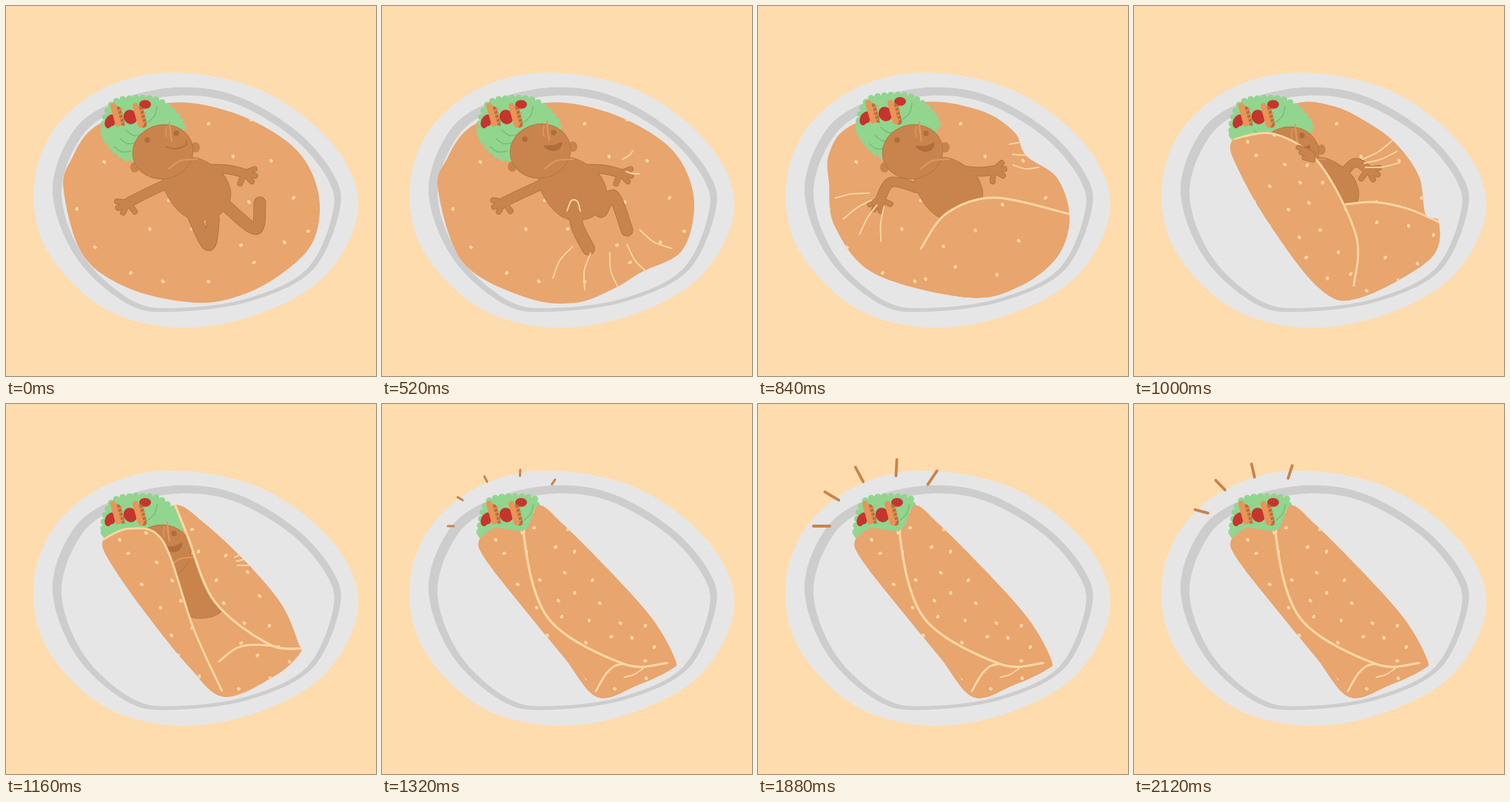
An HTML page with a canvas that plays this animation: 500x500 px, repeating every 2200 ms.

```html
<!DOCTYPE html>
<html>
<head>
<meta charset="utf-8">
<style>
html, body { margin: 0; width: 100%; height: 100%; overflow: hidden; background: #ffdcae }
canvas { display: block; width: 500px; height: 500px }
</style>
</head>
<body>
<canvas id="c" width="500" height="500"></canvas>
<script>
const ctx = document.getElementById('c').getContext('2d');
ctx.lineCap = ctx.lineJoin = 'round';
const DOUGH = '#e8a56e', CREAM = '#ffd7a4', SKIN = '#c8844c', EDGE = '#b67440', FACE = '#b06d3b',
  STRAND = '#e0985f', GREEN = '#91d58f', VEIN = '#75bd75', RED = '#c5352d', CARROT = '#e79558';
const RAD = Math.PI / 180;

const nums = s => s.split(/[ ,]+/).map(Number);
const poses = (...list) => list.map(nums);
const pairs = p => p.flatMap((x, i) => i % 2 ? [] : [[x, p[i + 1]]]);
const polar = (x, y, deg, r, ry = r) => [x + r * Math.cos(deg * RAD), y + ry * Math.sin(deg * RAD)];

const rim = nums('37,250 62,171 130,112 225,90 345,114 440,185 476,272 430,366 330,420 225,434 130,407 57,333');
const ring = nums('63,250 92,168 150,128 230,110 310,121 390,167 441,225 451,275 414,357 330,399 230,413 165,403 95,340');

// Key poses: lying, kicking, legs tucked, left side folded, wrapped
const KEYS = [0, 1, 5, 7, 10];
const tortilla = poses(
  '78,250 88,208 125,160 220,131 300,142 370,176 408,215 424,268 413,322 372,362 320,390 258,401 170,383 105,338',
  '76,250 87,208 125,160 220,131 300,142 370,176 407,215 422,270 405,331 350,360 315,381 262,401 195,394 110,347',
  '96,240 96,200 125,162 220,130 300,141 346,170 362,202 404,232 421,285 405,338 355,378 285,394 158,362 104,298',
  '136,210 132,183 152,172 218,132 268,135 310,154 353,185 385,230 394,281 412,292 400,342 303,395 250,381 180,290',
  '140,210 131,185 152,168 193,170 212,137 245,163 305,223 365,290 396,345 390,359 345,380 291,396 245,341 185,268');
const lettuce = poses(
  '132,168 140,137 160,126 206,128 238,160 222,182 172,206 145,193',
  '132,173 140,137 160,126 206,128 204,150 195,170 170,180 140,178');
const torso = nums('212,236 228,213 258,206 293,228 303,258 285,284 252,288 226,268');

// Only the moving edge of each flap; the rest is bounded by the tortilla
const low0 = '205,405 263,402 330,378 405,333';
const lowFlap = poses(low0, low0, '220,328 255,280 320,259 420,281', '286,268 325,265 370,274 412,292', '289,388 305,362 326,351 385,350');
const left0 = '85,180 80,230 80,280 105,340 150,380';
const leftFlap = poses(left0, left0, left0, '133,180 190,173 250,212 300,310 297,378', '128,186 155,166 193,172 230,300 289,392');
const right0 = '270,130 352,175 395,220 410,270 425,292';
const rightFlap = poses(right0, right0, right0, right0, '207,138 192,180 225,290 326,351 385,350');

// Limbs: three joints each
const leftArm = poses('218,240 190,253 165,266', '218,240 190,253 165,265', '215,246 180,238 165,262', '205,225 215,215 226,206');
const rightArm = poses('275,220 300,221 322,226', '275,220 300,221 322,226', '275,222 300,224 318,222', '278,232 298,212 316,221');
const leftLeg = poses('248,270 273,322 280,288', '260,270 264,298 279,328', '262,272 270,285 275,295');
const rightLeg = poses('295,268 337,301 343,266', '296,278 313,257 331,303', '290,268 300,285 305,295');
const headShift = poses('0,0', '2,-1', '-3,0', '-3,3');
const saladShift = poses('0,0', '0,0', '4,-4', '0,0');

// Creases spread from a point: x, y, first and last angle, count, inner and outer radius
const creases = [
  [],
  poses('292,270 122 30 5 65 115', '310,220 -40 10 2 20 38'),
  poses('172,250 95 172 4 22 68', '290,210 -25 5 3 55 90'),
  poses('285,222 -32 -8 3 28 75'),
  poses('300,382 -25 -25 1 30 58')];

function curve(flat, closed) {
  const p = pairs(flat), n = p.length, path = new Path2D();
  const get = i => closed ? p[(i + n) % n] : p[Math.max(0, Math.min(n - 1, i))];
  path.moveTo(...p[0]);
  for (let i = 0; i < (closed ? n : n - 1); i++) {
    const [a, b, c, d] = [get(i - 1), get(i), get(i + 1), get(i + 2)];
    path.bezierCurveTo(b[0] + (c[0] - a[0]) / 6, b[1] + (c[1] - a[1]) / 6,
      c[0] - (d[0] - b[0]) / 6, c[1] - (d[1] - b[1]) / 6, ...c);
  }
  return path;
}

function fill(flat, color) {
  ctx.fillStyle = color;
  ctx.fill(curve(flat, true));
}

function line(flat, color, width, closed) {
  ctx.strokeStyle = color;
  ctx.lineWidth = width;
  ctx.stroke(curve(flat, closed));
}

function oval(x, y, rx, ry, color, turn = 0) {
  ctx.fillStyle = color;
  ctx.beginPath();
  ctx.ellipse(x, y, rx, ry, turn, 0, 7);
  ctx.fill();
}

function pose(keys, k) {
  let i = 0;
  while (i < 3 && k >= KEYS[i + 1]) i++;
  const f = Math.min(1, (k - KEYS[i]) / (KEYS[i + 1] - KEYS[i]));
  const last = keys[keys.length - 1], a = keys[i] || last, b = keys[i + 1] || last;
  return a.map((v, j) => v + (b[j] - v) * f);
}

// A sheet of dough with sesame scattered on a jittered grid
function dough(path, seed, gap) {
  const rand = () => (seed = seed * 16807 % 2147483647) / 2147483647;
  ctx.save();
  ctx.clip(path);
  ctx.fillStyle = DOUGH;
  ctx.fillRect(0, 0, 500, 500);
  for (let y = 100, row = 0; y < 410; y += gap * .85, row++)
    for (let x = 60 + row % 2 * gap / 2; x < 440; x += gap)
      oval(x + gap * .5 * rand(), y + gap * .5 * rand(), 2.7, 2.1, CREAM, rand() * 3);
  ctx.restore();
}

function flap(edge, corners, seed, gap, width) {
  const path = curve(edge);
  for (const c of corners) path.lineTo(...c);
  dough(path, seed, gap);
  line(edge, CREAM, width);
}

function drawPlate() {
  ctx.fillStyle = '#ffdcae';
  ctx.fillRect(0, 0, 500, 500);
  fill(rim, '#e6e6e6');
  fill(ring, '#cdcdcd');
  ctx.save();
  ctx.translate(15.4, 16.9);
  ctx.scale(.946, .947);
  fill(ring, '#e6e6e6');
  ctx.restore();
}

function drawSalad(k) {
  ctx.save();
  ctx.translate(...pose(saladShift, k));
  const leaf = pose(k < 10 ? lettuce.slice(0, 1) : lettuce.slice(1), k);
  fill(leaf, GREEN);
  ctx.setLineDash([0, 9]);
  line(leaf, GREEN, 9, true);
  ctx.setLineDash([]);
  oval(141, 156, 7, 10, RED, .5);
  oval(168, 150, 9, 10, RED, -.6);
  oval(188, 133, 8, 6, RED);
  for (const x of [148, 178]) {
    line([x + 3, 140, x + 8, 160], '#b9703f', 9);
    line([x - 3, 135, x + 4, 160], CARROT, 8);
    for (let y = 139; y < 160; y += 6) line([x + 3, y + 3, x + 10, y], CARROT, 1.5);
  }
  for (let i = 0; i < 6; i++) oval(136 + i * 10, 173 - 4 * Math.sin(i), 8, 8, GREEN);
  if (k < 10)
    for (let i = 0; i < 3; i++) line([146 + i * 8, 190 - i * 11, 156 + i * 8, 197 - i * 11, 169 + i * 6, 196 - i * 11], VEIN, 1.5);
  line([204, 136, 201, 148, 192, 157], VEIN, 1.5);
  ctx.restore();
}

function drawHead(k) {
  ctx.save();
  ctx.translate(...pose(headShift, k));
  for (const [x, y] of [[174, 218], [256, 191]]) oval(x, y, 6, 7, SKIN);
  oval(212, 197, 41.5, 37, EDGE, -.2);
  oval(212, 197, 40.5, 36, SKIN, -.2);
  oval(191, 181, 3.8, 3.8, FACE);
  oval(230, 172, 3.8, 3.8, FACE);
  if (k) fill([216, 190, 229, 189, 241, 185, 238, 194, 227, 197], FACE);
  else line([216, 190, 230, 193, 243, 188, 244, 182], FACE, 1.7);
  line([221, 157, 222, 170, 224, 182], STRAND, 2.2);
  line([217, 163, 216, 171, 217, 177], STRAND, 1.5);
  ctx.restore();
}

// Three fingers and a thumb, turned along the forearm
function fingers(arm, side) {
  const [, , ex, ey, x, y] = arm;
  const aim = Math.atan2(y - ey, x - ex) / RAD;
  return [-35, 0, 35, 100].map(a => [x, y, ...polar(x, y, aim + side * a, 15)]);
}

function drawBody(k) {
  const la = pose(leftArm, k), ra = pose(rightArm, k);
  const parts = [[la, 12], [ra, 11], ...[...fingers(la, -1), ...fingers(ra, 1)].map(f => [f, 6])];
  if (k < 7) parts.push([pose(leftLeg, k), 16], [pose(rightLeg, k), 15]);
  for (const [color, extra] of [[EDGE, 2], [SKIN, 0]]) {
    for (const [p, w] of parts) line(p, color, w + extra);
    fill(torso, color);
    line(torso, color, extra || .5, true);
  }
  drawHead(k);
  line([220, 220, 236, 209, 258, 207], STRAND, 2);
  if (k && k < 4) line([250, 277, 256, 263, 264, 264, 268, 277], CREAM, 1.8);
}

function drawFlaps(k) {
  if (k > 1) {
    const e = pose(lowFlap, k);
    flap(e, [[450, 420], [e[0], 420]], 5, k < 7 ? 58 : 45, 2.8);
  }
  if (k > 5) flap(pose(leftFlap, k), [[280, 440], [0, 440], [0, 180]], 11, 38, k < 10 ? 2.8 : 0.1);
  if (k > 6 && k < 9)
    for (const [color, w] of [[EDGE, 7], [SKIN, 5]])
      for (let i = 0; i < 3; i++) line([222 + i * 4, 191 + i * 7, 232 + i * 3, 195 + i * 6, 242, 200 + i * 4], color, w);
  if (k > 7) flap(pose(rightFlap, k), [[500, 350], [500, 100], [207, 100]], 29, 36, 3.2);
}

function drawCreases(list) {
  for (const [x, y, from, to, count, r0, r1] of list)
    for (let i = 0; i < count; i++) {
      const a = from + (to - from) * i / Math.max(1, count - 1);
      line([r0, (r0 + r1) / 2, r1].flatMap((r, j) => polar(x, y, a + j % 2 * 3, r)), CREAM, 1.8);
    }
}

function drawRays(k) {
  const odd = k % 2 && k > 11, length = k === 11 ? 8 : odd ? 18 : 22;
  for (let a = odd ? 195 : 180; a < 305; a += 31) {
    const [x, y] = polar(182, 165, a, 85, 68);
    line([x, y, ...polar(x, y, a, length)], SKIN, k === 11 ? 3 : 3.8);
  }
}

function draw(k) {
  const stage = k < 1 ? 0 : k < 3 ? 1 : k < 7 ? 2 : k < 10 ? 3 : 4;
  const base = curve(pose(tortilla, k), true);
  drawPlate();
  dough(base, 7, 58);
  drawSalad(k);
  ctx.save();
  ctx.clip(base);
  if (k < 10) drawBody(k);
  drawFlaps(k);
  drawCreases(creases[stage]);
  ctx.restore();
  if (k > 10) drawRays(k);
}

const start = performance.now();
function tick() {
  const t = (performance.now() - start) % 2200;
  draw(t < 520 ? 0 : Math.floor((t - 520) / 80) + 1);
  requestAnimationFrame(tick);
}
tick();
</script>
</body>
</html>
```
